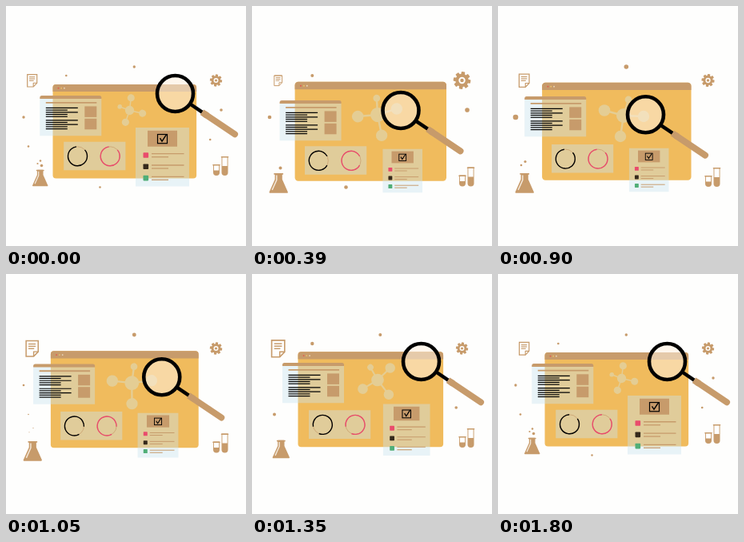
Write an HTML page with a canvas that moves like this. It is 300 by 300 pixels and loops after 1.83 s.

```html
<!DOCTYPE html>
<html>
<head>
<meta charset="utf-8">
<style>
  html, body { margin: 0; width: 100%; height: 100%; overflow: hidden; background: #fefefd; }
  canvas { display: block; width: 300px; height: 300px; }
</style>
</head>
<body>
<canvas id="stage"></canvas>
<script>
const LOOP = 1830, KEYS = [0, 390, 660, 900, 1170, 1350];
const TAN = '#c79b6b', ORANGE = '#f0bb5d', PALE = '#e4cd94', PAPER = '#fefefd';
const GLASS = 'rgba(200,226,238,.42)', PINK = '#e94b6c', INK = '#000';
const canvas = document.getElementById('stage'), c = canvas.getContext('2d');
const dpr = window.devicePixelRatio || 1;
canvas.width = canvas.height = 300 * dpr;
let now = 0;

// Smooth periodic curve through one value per key time, without overshoot.
function at(...v) {
  const n = KEYS.length;
  const time = i => KEYS[(i + n) % n] + LOOP * Math.floor(i / n);
  const val = i => v[(i + n) % n];
  const rise = i => (val(i + 1) - val(i)) / (time(i + 1) - time(i));
  const slope = i => {
    const a = rise(i - 1), b = rise(i);
    return a * b <= 0 ? 0 : 2 * a * b / (a + b);
  };
  let i = n - 1;
  while (KEYS[i] > now) i--;
  const h = time(i + 1) - time(i), u = (now - time(i)) / h, w = 1 - u;
  return val(i) * (1 + 2 * u) * w * w + val(i + 1) * u * u * (3 - 2 * u)
    + h * u * w * (slope(i) * w - slope(i + 1) * u);
}

function rect(x, y, w, h, fill, r = 0) {
  c.beginPath();
  c.roundRect(x, y, w, h, r);
  c.fillStyle = fill;
  c.fill();
}
function dot(x, y, r, fill) {
  if (r < .05) return;
  c.beginPath();
  c.arc(x, y, r, 0, 7);
  c.fillStyle = fill;
  c.fill();
}
function poly(points, width, stroke, fill) {
  c.beginPath();
  points.forEach(p => c.lineTo(...p));
  if (fill) { c.closePath(); c.fillStyle = fill; c.fill(); }
  if (width) { c.lineWidth = width; c.strokeStyle = stroke; c.stroke(); }
}
const line = (x1, y1, x2, y2, w, color) => poly([[x1, y1], [x2, y2]], w, color);

function place(x, y, scale, angle, draw) {
  c.save();
  c.translate(x, y);
  c.rotate(angle);
  c.scale(scale, scale);
  draw();
  c.restore();
}

function browser() {
  place(148.3, 157, at(89.8, 94.7, 94.7, 93.2, 91.8, 90.8) / 89.8, 0, () => {
    rect(-89.8, -59, 179.6, 117.6, ORANGE, 4);
    rect(-89.8, -59, 179.6, 9, TAN, [4, 4, 0, 0]);
    ['#e2574c', '#efc26a', '#ead9c0'].forEach((f, i) => dot(-82.8 + i * 3.7, -54.3, .9, f));
  });
}

function molecule() {
  const angle = at(-86, -20, 0, 0, -22, -46) * Math.PI / 180;
  place(at(154.5, 157, 157, 157, 157.5, 157), at(130.5, 136, 137, 137, 135, 132.5),
    at(.63, 1, 1, 1, .97, .87), angle, () => {
      const nodes = [[-24, -6.5, 7.3], [6, -20, 4.4], [25, 1, 7.2], [-4, 26, 7.2]];
      nodes.forEach(([x, y, r]) => { line(0, 0, x, y, 2.4, PALE); dot(x, y, r, PALE); });
      dot(0, 0, 9, PALE);
    });
}

function article() {
  place(at(42.3, 34.6, 31.6, 33.2, 35, 38), at(112, 118, 115, 113, 112, 111), 1, 0, () => {
    rect(0, 3.8, 77, 46.5, GLASS);
    rect(0, 0, 77, 4, TAN, [2.5, 2.5, 0, 0]);
    line(7.5, 8.8, 71, 8.8, 1.8, TAN);
    for (const y of [15.4, 30.8]) {
      [40, 27, 40, 27, 27].forEach((w, i) => line(7.5, y + i * 2.7, 7.5 + w, y + i * 2.7, 1.2, INK));
      rect(56, y - 2, 15, 13.5, TAN);
    }
  });
}

function rings() {
  place(at(72.2, 66, 66, 67, 69.2, 71), at(169.7, 175.2, 175.2, 173, 171.2, 170.3), 1, 0, () => {
    rect(0, 0, 77.2, 35.6, GLASS);
    const turn = (now < 1 ? -70 : at(-70, 0, 65, 290, 450, 500) + (now > KEYS[5] ? 0 : 0)) * Math.PI / 180;
    [[17.3, INK], [58, PINK]].forEach(([x, color]) => {
      const arc = (from, to, w, stroke) => {
        c.beginPath();
        c.arc(x, 18.1, 12, from, to);
        c.lineWidth = w;
        c.strokeStyle = stroke;
        c.stroke();
      };
      arc(0, 7, .7, TAN);
      arc(turn + .5, turn + 5.8, 1.4, color);
    });
  });
}

function checklist() {
  place(at(195.5, 188.2, 187.3, 188.7, 191.2, 193.2), at(188.7, 206, 208, 205, 198.5, 194.7),
    at(1, .74, .74, .74, .79, .875), 0, () => {
      rect(-33.5, -36.7, 67, 73.5, GLASS);
      rect(-18.5, -33, 37, 20, TAN);
      c.lineWidth = 1.2;
      c.strokeStyle = INK;
      c.strokeRect(-6, -28.2, 12, 11.2);
      poly([[-3, -23.5], [-.5, -19.5], [5, -28]], 1.4, INK);
      [PINK, '#35291b', '#50ae77'].forEach((color, i) => {
        const y = -2.2 + i * 14.3;
        rect(-24, y - 3.3, 6.6, 6.6, color, .8);
        line(-13.5, y - 1.8, 27, y - 1.8, 1.3, TAN);
        line(-13.5, y + 2.2, 7.5, y + 2.2, 1.3, TAN);
      });
    });
}

function magnifier() {
  place(at(211.5, 186, 184.5, 184.5, 205, 211.5), at(109.5, 130.5, 135.8, 135.8, 120, 109.5), 1, 0, () => {
    line(18, 12.5, 34, 23.3, 4.5, INK);
    c.lineCap = 'round';
    line(38, 26.3, 74.5, 50.8, 8, TAN);
    c.lineCap = 'butt';
    line(33.5, 23.2, 40, 27.6, 8, TAN);
    dot(0, 0, 22.5, 'rgba(255,240,222,.55)');
    c.beginPath();
    c.arc(0, 0, 22.5, 0, 7);
    c.lineWidth = 4.6;
    c.strokeStyle = INK;
    c.stroke();
  });
}

function documentIcon() {
  place(32.7, 93.3, at(1, .82, .75, 1.05, 1.35, 1.35), 0, () => {
    poly([[-6, -7.7], [6, -7.7], [6, 3], [1.5, 7.7], [-6, 7.7], [-6, -7.7], [6, -7.7]], 1.2, TAN);
    poly([[1.5, 7.7], [1.5, 3], [6, 3]], 1.1, TAN);
    [[3.5, -4.6], [3.5, -2.3], [2, 0]].forEach(([x, y]) => line(-3.7, y, x, y, 1.1, TAN));
  });
}

function gear() {
  place(262.5, 93, at(.69, .98, 1, .73, .69, .69), 0, () => {
    for (let i = 0; i < 8; i++)
      place(0, 0, 1, i * Math.PI / 4 + .15, () => rect(-2.3, -11, 4.6, 6, TAN, .8));
    dot(0, 0, 8.4, TAN);
    dot(0, 0, 4.3, PAPER);
    dot(0, 0, 2.3, TAN);
  });
}

function flask() {
  place(at(42.7, 33.2, 33.2, 33.2, 33.5, 36.3), at(225.5, 234, 234, 234, 233.5, 230.5),
    at(.83, 1, 1, 1, .98, .91), 0, () => {
      c.lineJoin = 'round';
      poly([[-3.6, -24], [3.6, -24], [3.6, -17], [10.7, -1.2], [-10.7, -1.2], [-3.6, -17]], 2, TAN, TAN);
      c.lineJoin = 'miter';
      rect(-6, -25, 12, 1.8, TAN, .8);
      poly([[-2.4, -22.5], [-2.4, -16.5], [-8, -4]], 1.5, '#f3e8da');
    });
  dot(at(44.5, 35.5, 35, 34, 34, 44.5), at(199.5, 202.5, 202.5, 194.5, 192, 203),
    at(1.8, 2, 1.8, 1.6, 0, 0), TAN);
  dot(at(39.5, 30, 29, 29, 29, 39.5), at(197, 200, 199, 199, 197, 199), at(1.1, 0, 1.4, 1.3, 0, 0), TAN);
  dot(43, 193.5, at(1.3, 0, 0, 0, 0, 0), TAN);
}

function tubes() {
  place(0, at(0, 13.5, 16, 14, 9, 5), 1, 0, () => {
    [[263, 198, 205.5], [273.5, 188, 200]].forEach(([x, top, level]) => {
      rect(x - 4, top, 8, 212 - top, TAN, [0, 0, 4, 4]);
      rect(x - 3.1, top + 1, 6.2, level - top - 1, PAPER);
      rect(x - 4.8, top, 9.6, 1.5, TAN, .7);
    });
  });
}

function sparks() {
  dot(22, 139, at(1.7, 2.3, 3, 3.3, 0, 0), TAN);
  dot(75.3, 87, at(1.3, 2, 0, 0, 0, 2.2), TAN);
  dot(160.3, 76, at(1.7, 0, 3, 2.8, 2.2, 2), TAN);
  dot(269, 130, at(1.8, 2.8, 3.3, 0, 0, 0), TAN);
  dot(255.2, 167, at(1.3, 0, 0, 0, 2.1, 1.8), TAN);
  dot(28, 175.5, at(1.3, 0, 0, 0, 1.6, 2), TAN);
  dot(117.5, 226.5, at(1.3, 2.3, 0, 0, 0, 0), TAN);
}

const parts = [browser, molecule, article, rings, checklist, magnifier,
  documentIcon, gear, flask, tubes, sparks];

function frame() {
  now = performance.now() % LOOP;
  c.setTransform(dpr, 0, 0, dpr, 0, 0);
  c.fillStyle = PAPER;
  c.fillRect(0, 0, 300, 300);
  parts.forEach(draw => draw());
  requestAnimationFrame(frame);
}
frame();
</script>
</body>
</html>
```
